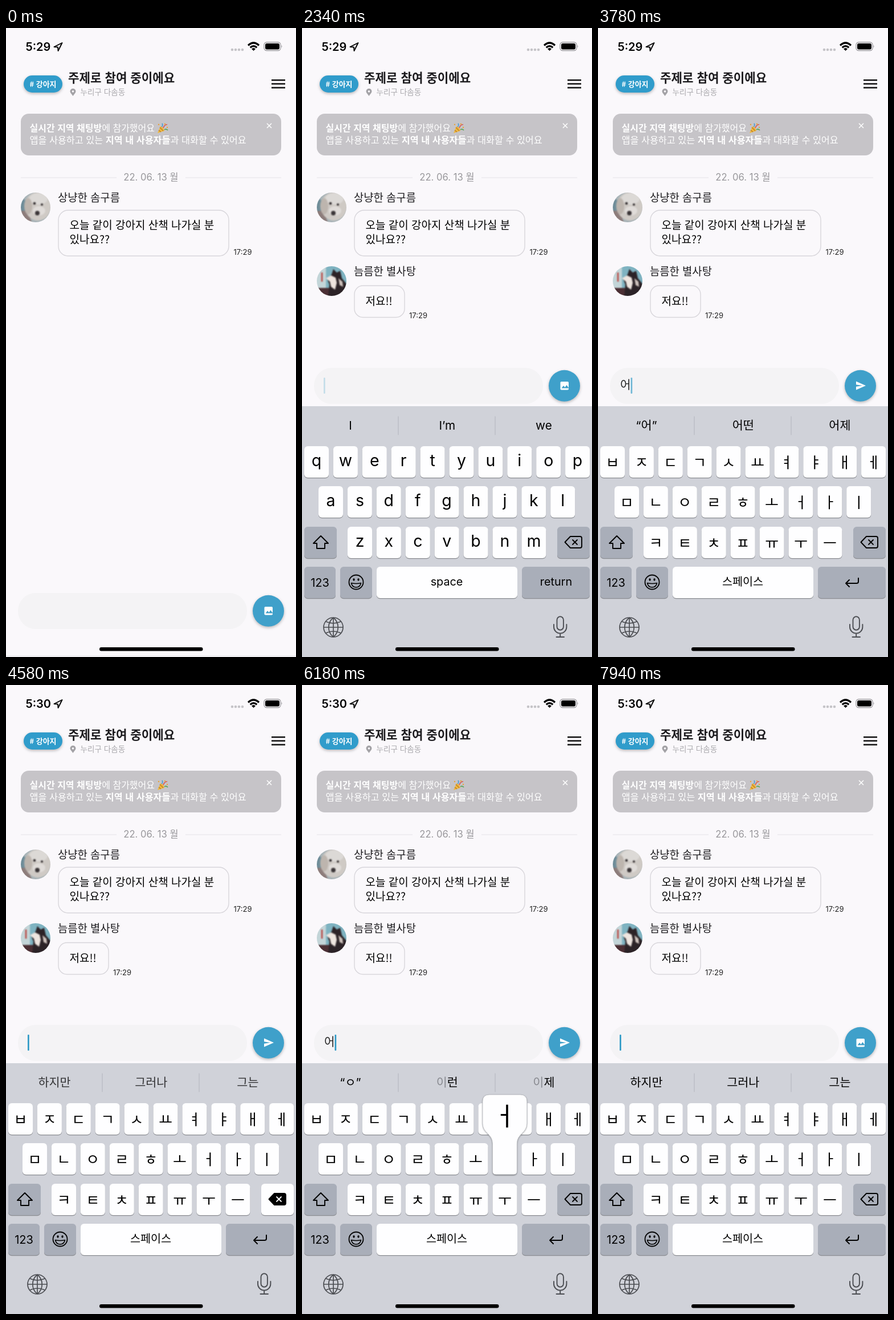
An HTML page that plays this animation: 509 px wide and 1101 px high, repeating every 8 s.

```html
<!DOCTYPE html>
<html lang="ko">
<head>
<meta charset="utf-8">
<title>Chat room</title>
<style>
  html, body { margin: 0; height: 100%; overflow: hidden; background: #faf8fb; }
  svg { display: block; width: 100vw; height: 100vh; font-family: 'Noto Sans CJK KR', 'Noto Sans CJK', sans-serif; }
  .ui { font-family: Inter, 'Noto Sans CJK KR', 'Noto Sans CJK', sans-serif; }
  .b { font-weight: 700; }
  .mid { text-anchor: middle; }
  .line { fill: none; stroke: #000; stroke-linecap: round; stroke-linejoin: round; }
  .lift { filter: drop-shadow(0 2px 2.5px #0004); }
  .soft { filter: blur(.8px); }
</style>
</head>
<body>
<svg viewBox="0 0 509 1101">
  <defs>
    <clipPath id="face1"><circle cx="52" cy="314" r="26"/></clipPath>
    <clipPath id="face2"><circle cx="52" cy="443" r="26"/></clipPath>
  </defs>
  <rect y="1098" width="509" height="3" fill="#f1f0f3"/>

  <!-- status bar -->
  <text id="clock" class="ui" x="34.5" y="39.5" font-size="20" font-weight="600"></text>
  <path class="line" d="M84.500 33 L98.500 26 L91.500 40 L91 33.500 Z" stroke-width="1.900"/>
  <g fill="#c5c4c8"><circle cx="397" cy="38" r="2.300"/><circle cx="403" cy="38" r="2.300"/><circle cx="409" cy="38" r="2.300"/><circle cx="415" cy="38" r="2.300"/></g>
  <g fill="none" stroke="#000" stroke-width="3.200"><path d="M425 30.500 Q434.500 21.500 444 30.500"/><path d="M428.700 34.300 Q434.500 29 440.300 34.300"/></g>
  <path d="M431 36.500 Q434.500 33.500 438 36.500 L434.500 40 Z"/>
  <rect x="453" y="25" width="29" height="14.500" rx="4.500" fill="none" stroke="#99989c" stroke-width="1.300"/>
  <rect x="455" y="27" width="25" height="10.500" rx="2.700"/>
  <path d="M483.500 30 q2 2.200 0 4.500 z" fill="#99989c"/>

  <!-- header -->
  <rect class="lift" x="31" y="83" width="68" height="30" rx="15" fill="#309ccb"/>
  <text class="b mid" x="65" y="102.500" font-size="13" fill="#fff"># 강아지</text>
  <text class="b" x="109" y="94.500" font-size="21.200" fill="#1c1b1e">주제로 참여 중이에요</text>
  <path d="M117.500 119 c-3-4-5-6-5-8 a5 5 0 0 1 10 0 c0 2-2 4-5 8z" fill="#a3a2a6"/>
  <circle cx="117.500" cy="111" r="1.800" fill="#faf8fb"/>
  <text x="130.500" y="117" font-size="13.600" fill="#abaaae">누리구 다솜동</text>
  <path d="M466 91.200h24M466 97.800h24M466 104.400h24" stroke="#111" stroke-width="2.500"/>

  <!-- notice -->
  <rect x="26" y="150" width="457" height="73" rx="14" fill="#c6c4c8"/>
  <g fill="#fff">
    <text x="41.500" y="181" font-size="16"><tspan class="b">실시간 지역 채팅방</tspan>에 참가했어요</text>
    <text x="41.500" y="202" font-size="16.250">앱을 사용하고 있는 <tspan class="b">지역 내 사용자들</tspan>과 대화할 수 있어요</text>
  </g>
  <path d="M458 167l8 8m0-8l-8 8" stroke="#fff" stroke-width="1.500"/>
  <path d="M266 184l5-12q6 2 7 8z" fill="#f0b93c"/>
  <path d="M268 179l4 3M270 174l6 6" stroke="#b97a2c" stroke-width="1.300"/>
  <g fill="none" stroke-width="1.700"><path d="M273 173q3-2 1-6" stroke="#4a9ed8"/><path d="M276 175q2-6 7-6" stroke="#d9534f"/><path d="M278 178q3-2 6 1" stroke="#5aa45b"/></g>
  <g fill="#e9a13a"><circle cx="268" cy="169" r="1.200"/><circle cx="279" cy="168" r="1.200"/><circle cx="283" cy="174" r="1.200"/></g>

  <!-- messages -->
  <path d="M26 262h168M315 262h168" stroke="#ebeaee" stroke-width="1.300"/>
  <text class="ui mid" x="254.500" y="267.300" font-size="16.600" fill="#98979b">22. 06. 13 월</text>

  <g clip-path="url(#face1)"><g class="soft">
    <rect x="24" y="286" width="56" height="56" fill="#a9b4b8"/>
    <path d="M24 300h9l4 20-13 4z" fill="#6f8d99"/>
    <path d="M24 320h14l8 22H24z" fill="#8d7d7b"/>
    <ellipse cx="56" cy="312" rx="23" ry="25" fill="#cfcac5"/>
    <ellipse cx="57" cy="299" rx="16" ry="10" fill="#dcd9d6"/>
    <ellipse cx="39" cy="312" rx="7" ry="14" fill="#bdb5ae"/>
    <ellipse cx="58" cy="320" rx="11" ry="8" fill="#e0dcd9"/>
    <circle cx="50" cy="307" r="2.300" fill="#332e30"/><circle cx="63" cy="309" r="2" fill="#332e30"/>
    <ellipse cx="55" cy="324" rx="4" ry="4" fill="#3b3638"/>
  </g></g>
  <text x="91" y="303.500" font-size="18.800" fill="#1e1d20">상냥한 솜구름</text>
  <rect x="92" y="319" width="299" height="80" rx="17" fill="none" stroke="#d8d6db" stroke-width="1.400"/>
  <g font-size="19"><text x="111.500" y="351.500">오늘 같이 강아지 산책 나가실 분</text><text x="111.500" y="376.500">있나요??</text></g>
  <text class="ui" x="399.500" y="396.700" font-size="13" fill="#222">17:29</text>

  <g id="reply">
    <g clip-path="url(#face2)"><g class="soft">
      <rect x="24" y="415" width="56" height="56" fill="#7fb3c1"/>
      <path d="M24 415h18v56H24z" fill="#c3d5d8"/>
      <path d="M35 428v16" stroke="#b9403c" stroke-width="2.500"/>
      <path d="M24 455h32v16H24z" fill="#4b2f34"/>
      <path d="M46 471l2-22-3-8 7-10 3-9 6 6 6-3 3 13 10 12v21z" fill="#2c2327"/>
      <path d="M42 438l9-5 8 4 2 9-3 12-7-5-2-9z" fill="#eee5df"/>
      <path d="M64 438l7 6 1 9-6-3z" fill="#cfc3bd"/>
    </g></g>
    <text x="91" y="432.500" font-size="18.800" fill="#1e1d20">늠름한 별사탕</text>
    <rect x="92" y="451" width="88" height="55.500" rx="15" fill="none" stroke="#d8d6db" stroke-width="1.400"/>
    <text x="111.500" y="484.500" font-size="19">저요!!</text>
    <text class="ui" x="188" y="507.700" font-size="13" fill="#222">17:29</text>
  </g>

  <g id="bar"></g>
  <g id="board"></g>
  <rect x="164" y="1084" width="181.500" height="6.500" rx="3.250"/>
</svg>
<script>
const LOOP = 8000, STEP = 80, KEYBOARD = 1700, HANGUL = 2660, RISE = 349;
// Each round: first key press, moment of deletion
const ROUNDS = [[2980, 4580], [5060, 5700], [5860, 7780]];
const EDITS = [1760, ...ROUNDS.flatMap(([s, d]) => [s + 80, s + 320, d])];
const LAYOUT = {
  en: ['qwertyuiop', 'asdfghjkl', 'zxcvbnm'],
  ko: ['ㅂㅈㄷㄱㅅㅛㅕㅑㅐㅔ', 'ㅁㄴㅇㄹㅎㅗㅓㅏㅣ', 'ㅋㅌㅊㅍㅠㅜㅡ']
};
const ROW_X = [4, 29, 80], ROW_Y = [732, 802, 873], PITCH = 50.9;
const IDLE = ['하지만', '그러나', '그는'];

const $ = id => document.getElementById(id);
const clamp = v => Math.max(0, Math.min(1, v));
const label = (x, y, size, str, more = '') =>
  `<text class="ui mid" x="${x}" y="${y}" font-size="${size}" ${more}>${str}</text>`;
const line = (d, width, more = '') => `<path class="line" d="${d}" stroke-width="${width}" ${more}/>`;
const key = (x, y, w, fill = '#fefeff') =>
  `<rect x="${x}" y="${y + 1.3}" width="${w}" height="55" rx="6" fill="#8b8d92"/>` +
  `<rect x="${x}" y="${y}" width="${w}" height="55" rx="6" fill="${fill}"/>`;

function stateAt(t) {
  const round = ROUNDS.findLast(r => t >= r[0]);
  const s = { text: '', popup: '', send: 0, erase: false, words: IDLE, since: HANGUL };
  if (!round) {
    if (t < HANGUL) Object.assign(s, { words: ['I', 'I’m', 'we'], since: 2020 });
    return s;
  }
  const age = t - round[0], gone = t - round[1];
  if (gone >= 0) {
    s.send = clamp(1 - gone / 160);
    s.erase = gone < 160;
    s.since = round[1];
    return s;
  }
  s.send = clamp((age - 80) / 160);
  s.popup = age < 160 ? 'ㅇ' : age >= 240 && age < 400 ? 'ㅓ' : '';
  if (age >= 80) {
    s.text = age < 320 ? 'ㅇ' : '어';
    const faded = age < 320 ? '이' : '<tspan fill="#888a90">이</tspan>';
    s.words = age < 400 ? ['“ㅇ”', faded + '런', faded + '제'] : ['“어”', '어떤', '어제'];
    s.since = round[0] + (age < 400 ? 80 : 400);
  }
  return s;
}

function cursorAlpha(t) {
  const d = t - EDITS.findLast(e => t >= e);
  if (!(d >= 400)) return 1;
  const fade = clamp(d % 400 / 240);
  return Math.floor(d / 400) % 2 ? 1 - fade : fade;
}

function inputBar(t, s) {
  const cursor = t < KEYBOARD ? '' :
    `<rect x="${s.text ? 57.5 : 38}" y="1006" width="2.700" height="28" rx="1" fill="#2f9ac6" opacity="${cursorAlpha(t)}"/>`;
  return `<rect x="21" y="989" width="402" height="63" rx="31" fill="#f4f3f5"/>
    <text x="39" y="1025.500" font-size="20" fill="#222">${s.text}</text>${cursor}
    <circle class="lift" cx="460.500" cy="1020.300" r="27.500" fill="#3fa0ca"/>
    <g opacity="${1 - s.send}"><rect x="453.500" y="1013" width="14.500" height="14.500" rx="1.800" fill="#fff"/>
      <path d="M455.500 1024.500l3.500-4.500 2.500 3 3-4 4 5.500z" fill="#3fa0ca"/></g>
    <path d="M453 1012.500l17 7.500-17 7.500v-5.800l11-1.700-11-1.700z" fill="#fff" opacity="${s.send}"/>`;
}

function letters(lang) {
  const ko = lang == 'ko';
  return LAYOUT[lang].map((row, r) => [...row].map((ch, i) => {
    const x = ROW_X[r] + i * PITCH, y = ROW_Y[r];
    return key(x, y, 43) + label(x + 21.5, y + (ko ? 38 : 34.5), ko ? 26 : 28.5, ch);
  }).join('')).join('');
}

function popup(ch) {
  const cx = ROW_X[1] + LAYOUT.ko[1].indexOf(ch) * PITCH + 21.5;
  return `<path d="M${cx - 39} 729q0-12 12-12h54q12 0 12 12v38c0 18-17.500 18-17.500 36v48q0 6-6 6h-31q-6 0-6-6v-48c0-18-17.500-18-17.500-36z"
    fill="#fefeff" stroke="#b4b6bc" stroke-width=".9" style="filter:drop-shadow(0 1px 1px #0004)"/>` + label(cx, 771, 44, ch);
}

// hidden: 1 as the board first appears, 0 once it has settled
function keyboard(t, s, hidden) {
  const ko = t >= HANGUL, gray = '#a9aeb9', ink = 'style="stroke:#4b4d52"';
  const alpha = clamp((t < HANGUL ? 0 : .75) + (t - s.since) / 240);
  const space = !ko ? 'space' : t < ROUNDS[0][0] ? '한국어' : '스페이스';
  const top = 680 - 10 * hidden, bottom = 712 - 26 * hidden;
  return `<rect y="662" width="509" height="441" fill="#d0d2d9"/>` +
    line(`M169 ${top}V${bottom}M339 ${top}V${bottom}`, 1.2, 'style="stroke:#b8bac2"') +
    s.words.map((w, i) => label(85 + i * 169.7, 703, 20.7, w, `opacity="${alpha}"`)).join('') +
    letters(ko ? 'ko' : 'en') +
    key(4, 873, 57, gray) + line('M33 889l13 13h-6v9h-14v-9h-6z', 1.9) +
    key(448, 873, 57, s.erase ? '#fefeff' : gray) +
    line('M471 890h17q3 0 3 3v14q0 3-3 3h-17l-9.500-10z', 1.9, s.erase ? 'style="fill:#000"' : '') +
    line('M475 896l8 8m0-8l-8 8', 1.8, s.erase ? 'style="stroke:#fff"' : '') +
    key(4, 943, 55, gray) + label(31.5, 977.5, 20, '123') +
    key(67, 943, 56, gray) + line('M82.500 970a12.500 12.500 0 1 0 25 0a12.500 12.500 0 1 0-25 0', 1.8) +
    line('M86.500 971.500q8.500 2 17 0q-1.500 7.500-8.500 7.500t-8.500-7.500z', 1.5) +
    `<ellipse cx="91" cy="965.500" rx="1.600" ry="2.300"/><ellipse cx="99" cy="965.500" rx="1.600" ry="2.300"/>` +
    key(131, 943, 247) + label(254, 976, ko ? 19.6 : 19.8, space) +
    key(386, 943, 119, gray) +
    (ko ? line('M457 963v6q0 3-3 3h-19m6-6l-6 6l6 6', 2) : label(446, 976, 19.8, 'return')) +
    line('M38 1049a17 17 0 1 0 34 0a17 17 0 1 0-34 0M55 1032v34M38 1049h34M55 1032c-11 9-11 25 0 34c11-9 11-25 0-34M42 1039q13 6 26 0M42 1059q13-6 26 0', 1.7, ink) +
    line('M447.500 1036a5.700 5.700 0 0 1 11.400 0v12a5.700 5.700 0 0 1-11.400 0zM442 1044v4.500a11.200 11.200 0 0 0 22.400 0v-4.500M453.200 1060v6M446.500 1066h13.500', 1.9, ink) +
    (s.popup ? popup(s.popup) : '');
}

function render(t) {
  const s = stateAt(t), open = t >= KEYBOARD;
  const hidden = t < 2300 ? Math.exp((KEYBOARD - t) / 95) : 0;
  $('clock').textContent = t < 4100 ? '5:29' : '5:30';
  $('reply').style.display = t < 500 ? 'none' : '';
  $('bar').setAttribute('transform', `translate(0 ${t > KEYBOARD ? -394 : 0})`);
  $('bar').innerHTML = inputBar(t, s);
  $('board').setAttribute('transform', `translate(0 ${RISE * hidden})`);
  $('board').innerHTML = open ? keyboard(t, s, hidden) : '';
}

let shown = null;
function tick() {
  const t = Math.floor((performance.now() % LOOP - 20) / STEP) * STEP + 20;
  if (t !== shown) render(shown = t);
  requestAnimationFrame(tick);
}
tick();
</script>
</body>
</html>
```
